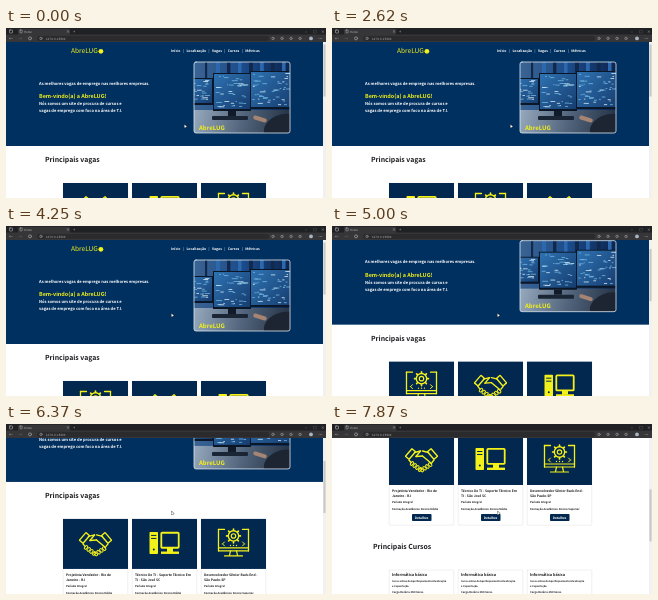
Recreate the animation shown at these times as an HTML page with a canvas. Size 320 by 170 pixels, loop 8 s.

```html
<!DOCTYPE html>
<html lang="pt-BR">
<head>
<meta charset="utf-8">
<title>Vagas</title>
<style>
html, body { margin: 0; width: 100%; height: 100%; overflow: hidden; background: #fff; }
canvas { display: block; width: 320px; height: 170px; }
</style>
</head>
<body>
<canvas id="stage"></canvas>
<script>
const W = 320, H = 170, LOOP = 8000, TOP = 14;
const NAVY = '#00305f', CARD_NAVY = '#02284f', YELLOW = '#f4f01a', INK = '#1c1c20', PALE = '#b8b8ba';
const FONT = '"Noto Sans CJK JP", "Noto Sans CJK SC", "Noto Sans CJK", "Noto Sans", sans-serif';
const BRAND = 'AbreLUG';
const COL = 57, PITCH = 69, CARD_W = 65;
const SLIDE_EVERY = 2000, FIRST_SLIDE = 1320, SLIDE_MS = 370, SLIDES = 3;

const jobs = [
  { title: ['Projetista Vendedor - Rio de', 'Janeiro - RJ'], level: 'Médio', icon: handshake },
  { title: ['Técnico De TI - Suporte Técnico Em', 'TI - São José SC'], level: 'Médio', icon: computer },
  { title: ['Desenvolvedor Sênior Back-End -', 'São Paulo-SP'], level: 'Superior', icon: codeScreen }
];

const canvas = document.getElementById('stage');
const ctx = canvas.getContext('2d');
const dpr = window.devicePixelRatio || 1;
canvas.width = W * dpr;
canvas.height = H * dpr;
ctx.textRendering = 'geometricPrecision';
ctx.lineJoin = ctx.lineCap = 'round';

// --- Motion ---

const clamp = v => Math.max(0, Math.min(1, v));
const smooth = v => v * v * (3 - 2 * v);
const move = (t, from, to) => smooth(clamp((t - from) / (to - from)));

// Three turns of the mouse wheel
const scrollAt = t => 47 * move(t, 4600, 5510) + 46 * move(t, 6160, 6760) + 51 * move(t, 7270, 7850);

// The carousel advances at a fixed interval until the pointer rests on it
function slideAt(t) {
  let n = 0;
  for (let i = 0; i < SLIDES; i++) {
    const p = clamp((t - FIRST_SLIDE - i * SLIDE_EVERY) / SLIDE_MS);
    n += smooth(1 - (1 - p) ** 1.6);
  }
  return n;
}

function seeded(seed) {
  return () => (seed = seed * 16807 % 2147483647) / 2147483647;
}

// --- Drawing helpers ---

function rect(x, y, w, h, color) {
  ctx.fillStyle = color;
  ctx.fillRect(x, y, w, h);
}

function text(str, x, y, size, color, weight = 700) {
  ctx.font = `${weight} ${size}px ${FONT}`;
  ctx.fillStyle = color;
  ctx.fillText(str, x, y);
  return ctx.measureText(str).width;
}

function lines(list, x, y, step, size, color) {
  list.forEach((s, i) => text(s, x, y + i * step, size, color));
}

function stroke(color, width) {
  ctx.strokeStyle = color;
  ctx.lineWidth = width;
  ctx.stroke();
}

function line(x1, y1, x2, y2, color, width) {
  ctx.beginPath();
  ctx.moveTo(x1, y1);
  ctx.lineTo(x2, y2);
  stroke(color, width);
}

function box(x, y, w, h, r, fill, edge, width) {
  ctx.beginPath();
  ctx.roundRect(x, y, w, h, r);
  if (fill) { ctx.fillStyle = fill; ctx.fill(); }
  if (edge) stroke(edge, width);
}

function dot(x, y, r, fill, edge, width) {
  ctx.beginPath();
  ctx.arc(x, y, r, 0, Math.PI * 2);
  if (fill) { ctx.fillStyle = fill; ctx.fill(); }
  if (edge) stroke(edge, width);
}

function fade(x1, y1, x2, y2, ...colors) {
  const g = ctx.createLinearGradient(x1, y1, x2, y2);
  colors.forEach((c, i) => g.addColorStop(i / (colors.length - 1), c));
  return g;
}

// Draws a half and its reflection about x
function mirrored(x, half) {
  for (const side of [1, -1]) {
    ctx.save();
    ctx.translate(x, 0);
    ctx.scale(side, 1);
    half(side);
    ctx.restore();
  }
}

function tilted(x, y, angle, paint) {
  ctx.save();
  ctx.translate(x, y);
  ctx.rotate(angle);
  paint();
  ctx.restore();
}

// --- Icons, centred on a card ---

function handshake() {
  const w = 1.4;
  mirrored(CARD_W / 2, () => {
    tilted(-11, 19, -0.86, () => box(-5, -2.4, 10, 4.8, 0.4, null, YELLOW, w));
    line(-7, 17.5, -1, 16, YELLOW, w);
    line(-12.5, 25, -10.5, 27.5, YELLOW, w);
  });
  line(31.5, 16, 27, 21.5, YELLOW, w);
  line(27, 21.5, 33.5, 21, YELLOW, w);
  line(33.5, 21, 42.5, 28.5, YELLOW, w);
  for (let i = 0; i < 4; i++) {
    tilted(23 + i * 2.7, 28.5 + i * 2, -0.85, () => box(-2, -1.2, 4, 2.4, 1.2, null, YELLOW, 1));
    tilted(41.5 - i * 2.8, 30 + i * 1.8, 0.75, () => box(-2.5, -1.2, 4, 2.4, 1.2, null, YELLOW, 1));
  }
}

function computer() {
  box(17.5, 13, 8.5, 22, 0.8, YELLOW);
  for (let i = 0; i < 2; i++) line(19.5, 16.5 + i * 3, 24, 16.5 + i * 3, CARD_NAVY, 1);
  dot(21.8, 30.5, 1, CARD_NAVY);
  box(29.3, 13.8, 17.4, 15, 0.8, null, YELLOW, 1.8);
  rect(35, 29, 6, 4, YELLOW);
  rect(29, 32.6, 18, 2.4, YELLOW);
}

function codeScreen() {
  const cx = CARD_W / 2, cy = 17;
  mirrored(cx, () => {
    line(-9, 10.5, -15, 10.5, YELLOW, 1.3);
    line(-15, 10.5, -15, 32, YELLOW, 1.3);
    line(-9, 23, -11, 25, YELLOW, 1);
    line(-11, 25, -9, 27, YELLOW, 1);
    line(-3, 32, -4, 36.5, YELLOW, 1.2);
  });
  for (const [y, half] of [[29, 15], [32, 15], [37, 9]]) line(cx - half, y, cx + half, y, YELLOW, 1.2);
  for (let i = 0; i < 3; i++) dot(cx - 3 + i * 3, 26.5, 0.7, YELLOW);
  dot(cx, cy, 5.2, null, YELLOW, 1.4);
  dot(cx, cy, 2.2, null, YELLOW, 1.2);
  for (let i = 0; i < 8; i++)
    tilted(cx, cy, i * Math.PI / 4, () => line(5.8, 0, 6.9, 0, YELLOW, 1.7));
}

// --- Page ---

function monitor(x, y, w, h, rnd) {
  box(x, y, w, h, 0.6, '#0b1626');
  rect(x + 1, y + 1, w - 2, h - 3, fade(x, y, x + w, y + h, '#2f74b4', '#153a6c'));
  for (let i = 0; i < w; i++) {
    const px = x + 2 + rnd() * (w - 9), py = y + 2 + rnd() * (h - 6);
    rect(px, py, 1 + rnd() * 5, 0.8, i % 3 ? '#6fb4dd' : '#d3e6f2');
  }
}

function photo() {
  const x = 188, y = 34, w = 96, h = 71, rnd = seeded(41);
  ctx.save();
  ctx.beginPath();
  ctx.roundRect(x, y, w, h, 2);
  ctx.clip();
  rect(x, y, w, h, fade(x, y, x + w, y, '#3c6492', '#1b4c8c', '#0c2550'));
  for (let i = 0; i < 9; i++) rect(x + i * 11, y, 1 + rnd() * 3, 22, i % 2 ? '#10294c' : '#2b68ad');
  rect(x, 82, w, 23, fade(x, 82, x + w, 105, '#97a9bd', '#52657c', '#222f42'));
  monitor(x - 4, 50, 23, 27, rnd);
  monitor(244, 43, 44, 38, rnd);
  monitor(207, 45, 38, 38, rnd);
  rect(222, 83, 8, 5, '#101a29');
  box(206, 88, 36, 4, 1, '#1a2636');
  ctx.beginPath();
  ctx.ellipse(275, 98, 18, 11, -0.4, 0, Math.PI * 2);
  ctx.fillStyle = '#1d2533';
  ctx.fill();
  tilted(254, 91, 0.3, () => box(-7, -2, 14, 4, 2, '#a58473'));
  text(BRAND, 193, 101.5, 6, YELLOW);
  ctx.restore();
  box(x, y, w, h, 2, null, '#dfe6ec', 0.8);
}

function hero() {
  const x = 33, size = 4.07, step = 7.2;
  rect(0, 0, W, 118, NAVY);
  const logo = text(BRAND, 65, 25.4, 6.6, YELLOW, 500);
  dot(68 + logo, 23.3, 2.4, YELLOW);

  let navX = 165;
  ['Início', 'Localização', 'Vagas', 'Cursos', 'Métricas'].forEach((label, i) => {
    if (i) text('|', navX - 3.6, 24, 3.45, '#fff', 400);
    navX += text(label, navX, 24, 3.45, '#fff') + 6;
  });
  text('As melhores vagas de emprego nas melhores empresas.', x, 56.8, size, '#fff');
  text(`Bem-vindo(a) a ${BRAND}!`, x, 70, 5.45, YELLOW);
  lines(['Nós somos um site de procura de cursos e', 'vagas de emprego com foco na área de T.I.'],
    x, 77.2, step, size, '#fff');
  photo();
}

function frame(x, y, h) {
  box(x + 0.2, y, CARD_W - 0.4, h, 0.5, '#fff', '#d8d8dc', 0.4);
}

function jobCard(job, x) {
  ctx.save();
  ctx.translate(x, 155);
  frame(0, 0.2, 90);
  rect(0, 0, CARD_W, 50, CARD_NAVY);
  job.icon();
  lines(job.title, 3, 57.2, 4.8, 3.3, INK);
  lines(['Período Integral', `Formação Acadêmica: Ensino ${job.level}`], 3, 67.6, 7.5, 2.64, INK);
  box(23, 79, 19.5, 7, 0.8, CARD_NAVY);
  text('Detalhes', 25.7, 83.7, 3.2, '#fff');
  ctx.restore();
}

function carousel(pos) {
  const first = Math.floor(pos), part = pos - first;
  ctx.save();
  ctx.beginPath();
  ctx.rect(COL - 2, 150, PITCH * 3, 100);
  ctx.clip();
  for (let i = 0; i < 4; i++) jobCard(jobs[(first + i) % 3], COL + PITCH * (i - part));
  ctx.restore();
}

function courses() {
  text('Principais Cursos', 41, 268.6, 6.9, INK);
  for (let i = 0; i < 3; i++) {
    const x = COL + PITCH * i;
    frame(x, 290, 60);
    text('Informática básica', x + 3, 295.6, 3.85, INK);
    lines(['Curso online de Aperfeiçoamento Atualização', 'e Capacitação.'], x + 3, 302, 4.6, 2.45, INK);
    text('Carga Horária 250 Horas.', x + 3, 312.8, 2.64, INK);
  }
}

// --- Window ---

function scrollbar(y) {
  rect(317, TOP, 3, H - TOP, '#f1f1f1');
  rect(317.4, TOP + 2.5 + y * 0.34, 2.2, 52, '#c8c8c8');
}

function browser() {
  const mid = 10.4;
  rect(0, 0, W, 7, '#202124');
  rect(0, 6.5, W, TOP - 6.5, '#363638');
  box(12, 0.8, 52, 7, 1.5, '#363638');
  box(3.5, 2, 3, 3, 0.5, null, PALE, 0.6);
  box(14, 2, 2.2, 2.8, 0.3, null, PALE, 0.5);
  text('Home', 18, 4.7, 2.8, PALE, 400);
  text('×', 60, 4.8, 4, PALE, 400);
  text('+', 67, 4.8, 4, PALE, 400);
  ['–', '□', '×'].forEach((s, i) => text(s, 299 + i * 8, 4.8, 3.6, PALE, 400));

  text('←', 3, 11.8, 4, PALE, 400);
  text('→', 12, 11.8, 4, '#707072', 400);
  dot(24, mid, 1.5, null, PALE, 0.6);
  box(31, 8, 232, 5, 2, '#2b2b2d');
  dot(35, mid, 1.2, null, PALE, 0.5);
  text('127.0.0.1:5500', 40, 11.6, 2.9, PALE, 400);
  for (let i = 0; i < 4; i++) dot(267 + i * 9, mid, 1.2, null, PALE, 0.5);
  dot(305, mid, 1.9, '#a9b4c0');
  for (let i = 0; i < 3; i++) dot(313 + i * 1.4, mid, 0.4, PALE);
}

function cursor(t) {
  const p = move(t, 3050, 3750);
  ctx.save();
  ctx.translate(178.5 - 13 * p, 96.5 - 9 * p);
  ctx.beginPath();
  ctx.lineTo(0, 0);
  ctx.lineTo(0, 3.2);
  ctx.lineTo(2.3, 2.3);
  ctx.closePath();
  stroke('#222', 0.7);
  ctx.fillStyle = '#fff';
  ctx.fill();
  ctx.restore();
}

function draw(t) {
  const y = scrollAt(t);
  ctx.setTransform(dpr, 0, 0, dpr, 0, 0);
  rect(0, 0, W, H, '#fff');
  ctx.save();
  ctx.translate(0, -y);
  hero();
  text('Principais vagas', 39, 133.9, 6.9, INK);
  carousel(slideAt(t));
  courses();
  ctx.restore();
  scrollbar(y);
  browser();
  cursor(t);
}

const start = performance.now();
function tick() {
  draw((performance.now() - start) % LOOP);
  requestAnimationFrame(tick);
}
tick();
</script>
</body>
</html>
```
